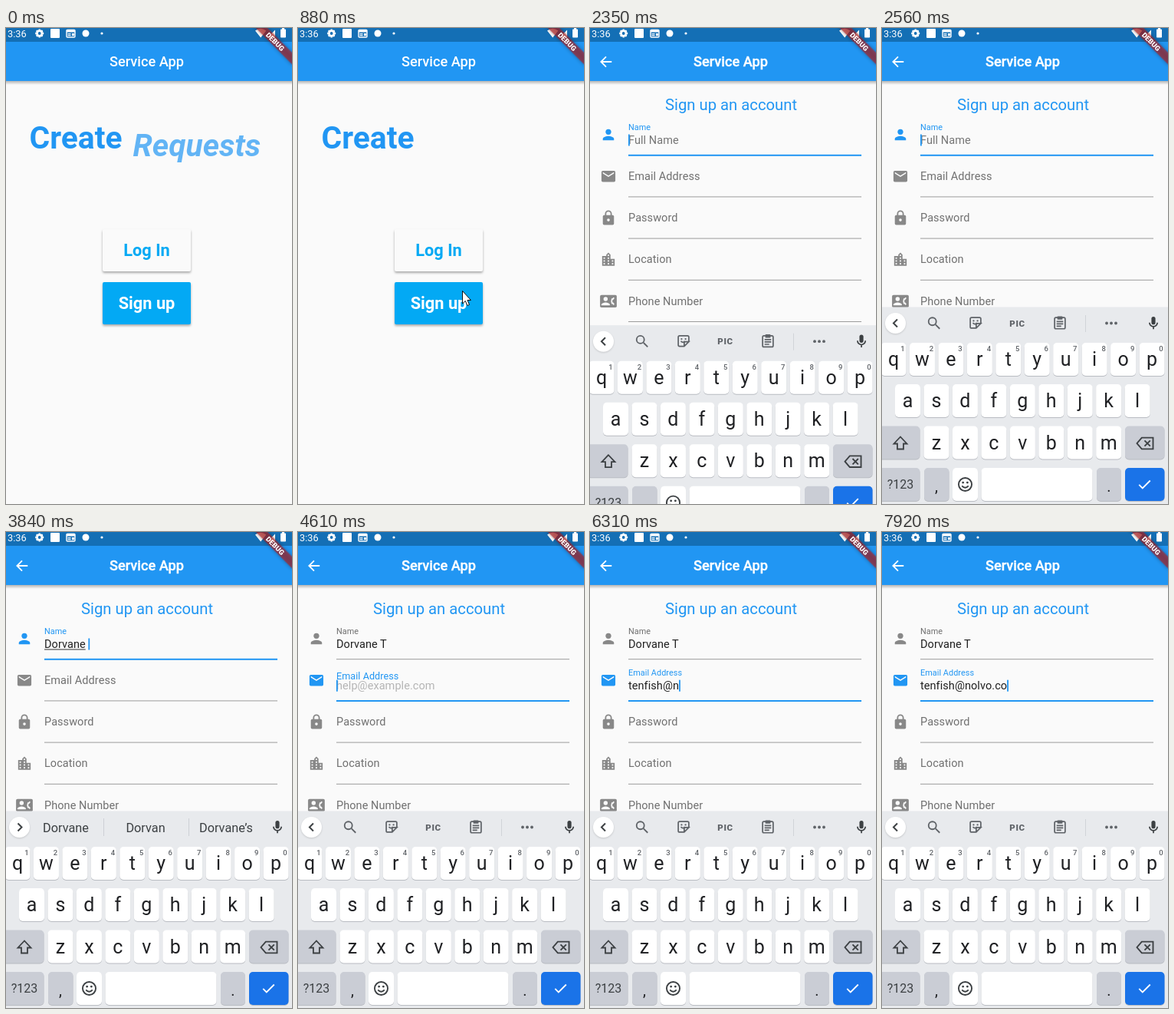
These frames come from a looping animation (373x620 px, 8000 ms). An HTML page:

```html
<!DOCTYPE html>
<html lang="en">
<head>
<meta charset="utf-8">
<title>Service App sign up</title>
<style>
html, body { margin: 0; width: 100%; height: 100%; overflow: hidden; background: #fafafa; }
svg { display: block; }
text { font-family: Roboto, Arial, sans-serif; white-space: pre; }
.mid { text-anchor: middle; }
.box { filter: drop-shadow(0 2px 1.5px rgba(0,0,0,.32)); }
.line { fill: none; stroke: currentColor; stroke-width: 2; }
.round { stroke-linecap: round; stroke-linejoin: round; }
.field { font-size: 14.5px; letter-spacing: .06px; }
.key { font-size: 25px; fill: #202124; }
.num { font-size: 9.5px; fill: #5f6368; font-weight: 500; }
.sug { font-size: 16.3px; fill: #3c4043; }
</style>
</head>
<body>
<svg id="stage" width="373" height="620" viewBox="0 0 373 620"></svg>
<script>
const BLUE = '#2196f3', LIGHT = '#03a9f4', GREY = '#888', PAPER = '#fafafa';
const LOOP = 8000, ROW = 54.2;

const rect = (x, y, w, h, fill, r = 0, more = '') =>
  `<rect x="${x}" y="${y}" width="${w}" height="${h}" rx="${r}" fill="${fill}" ${more}/>`;
const text = (x, y, s, more = '') => `<text x="${x}" y="${y}" ${more}>${s}</text>`;
const circle = (x, y, r, more = '') => `<circle cx="${x}" cy="${y}" r="${r}" ${more}/>`;
const line = (d, more = '') => `<path class="line" d="${d}" ${more}/>`;
// A 24-unit icon centred on x, y
const icon = (x, y, body, scale = .907, more = '') =>
  `<g transform="translate(${x} ${y}) scale(${scale}) translate(-12 -12)" fill="currentColor" ${more}>${body}</g>`;

const icons = {
  person: circle(12, 8, 4) + '<path d="M12 14c-2.7 0-8 1.3-8 4v2h16v-2c0-2.7-5.3-4-8-4z"/>',
  mail: '<path d="M4 4h16a2 2 0 0 1 2 2v12a2 2 0 0 1-2 2H4a2 2 0 0 1-2-2V6a2 2 0 0 1 2-2zM4 6v2l8 5 8-5V6l-8 5z"/>',
  lock: rect(4, 8, 16, 14, 'currentColor', 2) + line('M8 9V6a4 4 0 0 1 8 0v3') + circle(12, 15, 2, `fill="${PAPER}"`),
  city: '<path d="M15 11V5l-3-3-3 3v2H3v14h18V11z"/>' +
    [[5, 9], [5, 13], [5, 17], [11, 5], [11, 9], [11, 13], [11, 17], [17, 13], [17, 17]]
      .map(([x, y]) => rect(x, y, 2, 2, PAPER)).join(''),
  phone: rect(0, 3, 24, 18, 'currentColor', 2) + `<g fill="${PAPER}" color="${PAPER}">` + circle(8, 9, 3) +
    '<path d="M2 18v-1c0-2 4-3.1 6-3.1s6 1.1 6 3.1v1z"/>' +
    line('M20 7l-1.5 2h-1.2q-1.2 3 0 6h1.2l1.5 2') + '</g>'
};

const fields = [['Name', 'person'], ['Email Address', 'mail'], ['Password', 'lock'], ['Location', 'city'], ['Phone Number', 'phone']];
const hints = ['Full Name', 'help@example.com'];

function statusBar() {
  const teeth = [0, 45, 90, 135].map(a => rect(42.2, 1.5, 3, 11, '#fff', 1, `transform="rotate(${a} 43.7 7)"`)).join('');
  return rect(0, 0, 373, 18, '#146fb5') +
    text(2, 12, '3:36', 'font-size="12.8" fill="#fff"') +
    `<g fill="#fff" color="#fff">${teeth}` + circle(43.7, 7, 4.2) + circle(43.7, 7, 1.9, 'fill="#146fb5"') +
    rect(58, 1, 12, 12, '#fff', 1) +
    rect(79, 2.5, 11, 9.5, 'none', 1, 'stroke="#fff" stroke-width="1.4"') +
    '<path d="M79 3h11v2.5H79zM80.5 7h4v1.3h-4zM80.5 9h4v1.3h-4zM86 7h3v3.3h-3z"/>' +
    circle(104, 7, 4.5) + circle(125, 7, 1.6) +
    '<path d="M325 3.5q7.2-5.5 14.4 0L332.200 12.500zM341 12.500L351 2.500V12.500z"/>' +
    rect(358, 1.500, 7, 11, '#fff', .8) + rect(360, 0, 3, 2, '#fff') + '</g>';
}

const banner = () =>
  `<g transform="translate(373 -4) scale(.907) rotate(45)">` +
  rect(-42, 28, 84, 12, '#b71c1c', 0, 'fill-opacity=".63" style="filter:drop-shadow(0 0 3px rgba(0,0,0,.5))"') +
  text(0, 37.7, 'DEBUG', 'class="mid" font-size="10.2" font-weight="900" fill="#fff"') + '</g>';

const appBar = () =>
  rect(0, 69, 373, 5, 'url(#shade)') + rect(0, 18, 373, 51, BLUE) +
  text(183.5, 50.3, 'Service App', 'id="title" class="mid" font-size="18.2" font-weight="500" fill="#fff" stroke="#fff" stroke-width="0"');

const button = (y, fill, ink, label) =>
  rect(126, y, 115, 55, fill, 2, 'class="box"') +
  text(183.5, y + 35, label, `class="mid" font-size="21.8" font-weight="700" fill="${ink}"`);

const home = () =>
  text(30.5, 157, 'Create', `font-size="40.8" font-weight="700" fill="${BLUE}"`) +
  text(165.5, 166.5, 'Requests', `id="word" font-size="40.8" font-weight="700" font-style="italic" fill="${BLUE}"`) +
  button(262, PAPER, LIGHT, 'Log In') + button(331, LIGHT, '#fff', 'Sign up');

const fieldRow = ([label, name], i) =>
  `<g transform="translate(0 ${i * ROW})" class="field">` +
  icon(24, 139, icons[name], .907, `id="icon${i}" color="${GREY}"`) +
  rect(50, 165.2, 304, 1, '#9c9c9c', 0, `id="line${i}"`) +
  `<text id="label${i}" fill="#707070" transform="translate(50 143.800)">${label}</text>` +
  (i < 2 ? text(50, 151, hints[i], `id="hint${i}" fill="#757575"`) +
    text(50, 151, '', `id="value${i}" fill="#212121"`) +
    rect(50, 152.500, 0, 1, '#333', 0, `id="under${i}"`) +
    rect(50, 138.500, 1.8, 15, BLUE, 0, `id="caret${i}"`) : '') + '</g>';

const form = () =>
  '<g id="form">' + rect(0, 74, 373, 546, PAPER) + rect(0, 69, 373, 5, PAPER) + rect(0, 69, 373, 5, 'url(#shade)') +
  icon(21, 44, line('M20 12H5M12 4.700L4.700 12l7.300 7.300'), .907, 'color="#fff"') +
  text(184, 106.500, 'Sign up an account', `class="mid" font-size="20.25" fill="${BLUE}"`) +
  fields.map(fieldRow).join('') +
  rect(138, 401.500, 92, 56, PAPER, 1, 'class="box" stroke="#7c9fe4"') +
  text(183.500, 435, 'Sign up', `class="mid" font-size="16.4" font-weight="500" fill="${LIGHT}"`) + '</g>';

const key = (x, y, w, fill = '#fff') =>
  rect(x, y + 1, w, 43, '#b9bcc2', 5) + rect(x, y, w, 43, fill, 5);

function letters(row, x, y, numbered) {
  return [...row].map((c, i) => {
    const mid = x + i * 37.450;
    return key(mid - 16.500, y, 33) + text(mid, y + 30, c, 'class="key mid"') +
      (numbered ? text(mid + 12, y + 11, (i + 1) % 10, 'class="num mid"') : '');
  }).join('');
}

function keyboard() {
  const dark = '#cacdd5', ink = 'color="#3c4043"';
  const tools =
    icon(68, 384.500, circle(9.500, 9.500, 5.500, 'class="line"') + line('M14 14l6 6'), .907) +
    icon(122, 384, line('M20 13V6a2 2 0 0 0-2-2H6a2 2 0 0 0-2 2v12a2 2 0 0 0 2 2h7l7-7h-5a2 2 0 0 0-2 2v5M8 12q3 4 6 0') + circle(9, 9, 1.300) + circle(15, 9, 1.300), .86) +
    text(176.500, 388.500, 'PIC', 'class="mid" font-size="11.5" font-weight="900" letter-spacing=".7" fill="#5f6368"') +
    icon(232, 384, rect(4, 4, 16, 17, 'none', 2, 'stroke="currentColor" stroke-width="2"') + rect(8, 2, 8, 5, 'currentColor', 1) + line('M7 10h10M7 13.500h10M7 17h7', 'stroke-width="1.500"'), .86) +
    rect(265, 374, 1, 22, '#d0d3d8') + [293, 299, 305].map(x => circle(x, 384.500, 1.900, 'fill="#5f6368"')).join('');
  const words = [78, 182, 287].map((x, i) => text(x, 390.800, '', `id="sug${i}" class="sug mid"`)).join('') +
    rect(127, 373, 1, 23, '#cdd0d5') + rect(238, 373, 1, 23, '#cdd0d5');
  return `<g id="keys" ${ink}>` + rect(0, 363.500, 373, 260, '#e8eaed') +
    circle(17.500, 384.500, 13.500, 'fill="#fff" style="filter:drop-shadow(0 1px 1px rgba(0,0,0,.15))"') +
    line('', 'id="chevron"') +
    `<g id="tools" color="#5f6368">${tools}</g><g id="words">${words}</g>` +
    icon(354, 384.500, line('M12 5v6', 'class="line round" style="stroke-width:6;stroke-linecap:round"') + line('M6 11a6 6 0 0 0 12 0M12 17v4'), .86) +
    letters('qwertyuiop', 15, 410, true) + letters('asdfghjkl', 33.500, 464) + letters('zxcvbnm', 71, 518.500) +
    key(-4, 518.500, 53.500, dark) + icon(24, 540.500, line('M12 4L3.500 13H8v7h8v-7h4.500z', 'style="stroke-width:1.800"'), 1) +
    key(317, 518.500, 51.500, dark) + icon(343, 541, line('M8 5h14v14H8L2 12zM11.500 8.500l7 7M18.500 8.500l-7 7', 'style="stroke-width:1.800"'), 1.05) +
    key(-4, 573, 53.500, dark) + text(24, 600, '?123', 'class="mid" font-size="16" fill="#3c4043"') +
    key(55, 573, 32.500, dark) + text(71, 604, ',', 'class="mid" font-size="20" fill="#202124"') +
    key(92, 573, 33) + icon(108.500, 594.500, circle(12, 12, 9, 'class="line"') + circle(9, 9.500, 1.500) + circle(15, 9.500, 1.500) + line('M7.500 14q4.500 5 9 0'), .95) +
    key(129.500, 573, 145) + key(280, 573, 32, dark) + text(296, 604, '.', 'class="mid" font-size="20" fill="#202124"') +
    key(317, 573, 51.500, '#1a73e8') + icon(342.500, 594.500, line('M4 12.500l5 5L20 6.500'), .907, 'color="#fff"') + '</g>';
}

document.getElementById('stage').innerHTML =
  '<defs><linearGradient id="shade" x2="0" y2="1"><stop stop-opacity=".28"/><stop offset="1" stop-opacity="0"/></linearGradient></defs>' +
  rect(0, 0, 373, 620, PAPER) + appBar() + home() + form() + keyboard() + statusBar() + banner() +
  '<path id="mouse" d="M0 0V16.500l3.800-3.500 2.500 6 2.700-1.100-2.500-5.900H11z" fill="#fff" stroke="#111" stroke-linejoin="round"/>';

const $ = id => document.getElementById(id);
const set = (id, values) => { for (const k in values) $(id).setAttribute(k, values[k]); };
const show = (id, on) => set(id, { visibility: on ? 'visible' : 'hidden' });
const span = (t, from, to) => Math.min(1, Math.max(0, (t - from) / (to - from)));
const easeOut = (x, n = 2) => 1 - (1 - x) ** n;

const inputs = [
  { focus: 2070, float: 2130, blur: 4550, plain: 4060, value: 'Dorvane T',
    times: [3120, 3210, 3300, 3390, 3480, 3570, 3660, 3840, 4060] },
  { focus: 4550, float: 4550, blur: LOOP, plain: 5890, value: 'tenfish@nolvo.co',
    times: [5210, 5320, 5400, 5440, 5590, 5630, 5670, 6040, 6220, 6490, 6640, 6730, 6910, 7590, 7800, 7920] }
];
// Start time and the three words offered; none means the tool row
const offers = [
  [0], [3120, 'D', 'Do', 'Don’t'], [3300, 'Dor', 'Door', 'Doors'], [3480, 'Dorva', 'Dorvane', 'Doors'],
  [3840, 'Dorvane', 'Dorvan', 'Dorvane’s'], [4060, 'T', 'To', 'The'], [4300, 'T', 'Tea', 'Toy'], [4550],
  [5210, 't', 'test', 'thanks'], [5440, 'tenf', 'tent', 'tenfold'], [5670, 'tenfish', 'ten fish', 'tenfold'],
  [5890, 'tenfish', 'ten fish', 'tenfish’s'], [6310]
];
// Pointer path: time, x, y
const path = [[30, 24, 399], [450, 214.500, 342.500], [930, 214.500, 342.500], [1270, 110.500, 205], [1540, 110.500, 205], [1830, 121, 142.500], [2070, 121, 142.500]];

function drawInput(f, i, t) {
  const on = t >= f.focus && t < f.blur;
  const p = easeOut(span(t, f.float, f.float + 200));
  const count = f.times.filter(k => k <= t).length;
  const value = $('value' + i);
  value.textContent = f.value.slice(0, count);
  const trimmed = value.textContent.trimEnd().length;
  const width = count ? value.getComputedTextLength() : 0;
  const last = count ? f.times[count - 1] : f.focus;
  set('icon' + i, { color: on ? BLUE : GREY });
  set('line' + i, { fill: on ? BLUE : '#9c9c9c', height: on ? 2 : 1, y: on ? 164.800 : 165.200 });
  set('label' + i, { fill: on ? BLUE : '#707070', transform: `translate(50 ${143.800 - 10.800 * p}) scale(${1 - .25 * p})` });
  set('hint' + i, { opacity: p * (1 - span(t, f.times[0], f.times[0] + 230)) ** 3 });
  set('under' + i, { width: count && t < f.plain ? value.getSubStringLength(0, trimmed) : 0 });
  set('caret' + i, { x: 50 + width });
  show('caret' + i, on && (t - last) % 1050 < 515);
}

function drawMouse(t) {
  show('mouse', t >= 30 && t < 2070);
  const n = Math.max(1, path.findIndex(p => p[0] > t));
  const [a, b] = [path[n - 1], path[n]], x = span(t, a[0], b[0]), k = x * x * (3 - 2 * x);
  set('mouse', { transform: `translate(${a[1] + (b[1] - a[1]) * k} ${a[2] + (b[2] - a[2]) * k})` });
}

function draw(t) {
  set('word', { opacity: .7 * (1 - span(t, 0, 450)) });
  const page = span(t, 950, 1250);
  set('form', { opacity: page });
  set('title', { 'stroke-width': .35 * page });
  inputs.forEach((f, i) => drawInput(f, i, t));

  set('keys', { transform: `translate(0 ${260 * (1 - easeOut(span(t, 2230, 2450), 3))})` });
  const offer = offers.filter(o => o[0] <= t).pop(), words = offer.length > 1;
  show('words', words);
  show('tools', !words);
  set('chevron', { d: words ? 'M15.500 379.500l5 5-5 5' : 'M20 379.500l-5 5 5 5' });
  for (let i = 0; i < 3; i++) $('sug' + i).textContent = offer[i + 1] || '';
  drawMouse(t);
}

const start = performance.now();
function tick() {
  draw((performance.now() - start) % LOOP);
  requestAnimationFrame(tick);
}
tick();
</script>
</body>
</html>
```
